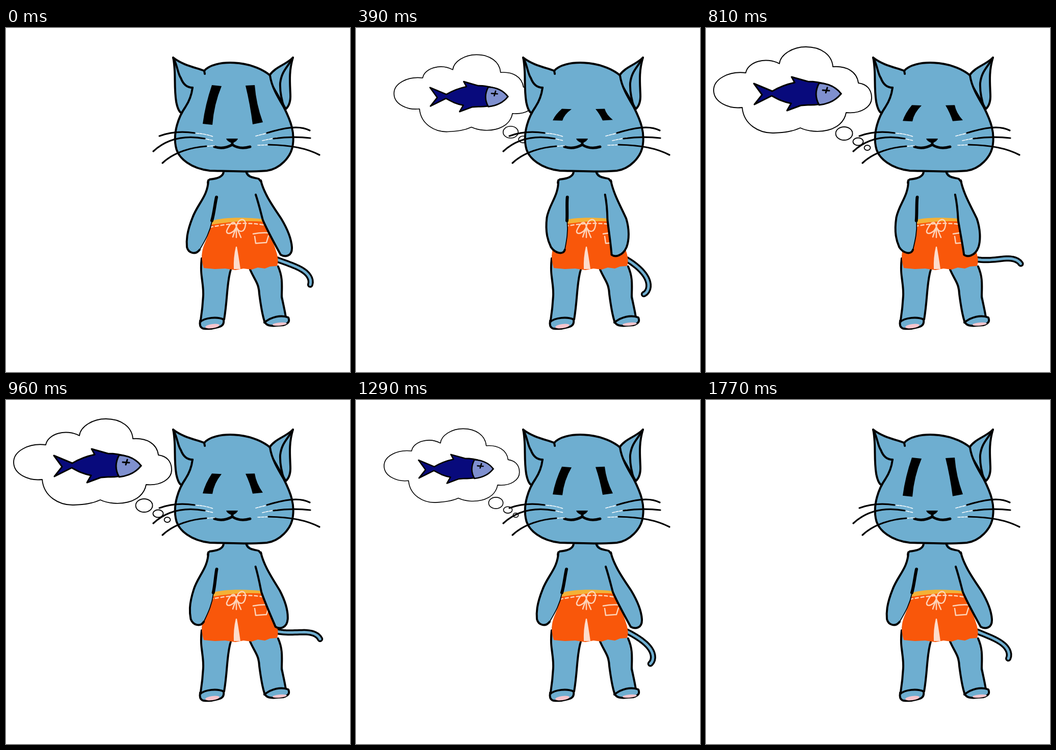
These frames come from a looping animation (675 by 675 pixels, 1800 ms). An HTML page:

```html
<!DOCTYPE html>
<html lang="en">
<head>
<meta charset="utf-8">
<title>Hungry cat</title>
<style>
  html, body { margin: 0; height: 100%; overflow: hidden; background: #fff; }
  svg { display: block; width: 100%; height: 100%; }
  path { stroke-linejoin: round; stroke-linecap: round; }
  .fur { fill: #6eaed0; stroke: #000; stroke-width: 4; }
  .bare { fill: #6eaed0; }
  .ink { fill: none; stroke: #000; stroke-width: 4; }
  .thin { stroke-width: 1.8; }
  .wide { stroke-width: 6; }
  .whisker { stroke-width: 3.2; }
  .stitch { fill: none; stroke: #fdd3b8; stroke-width: 2.5; }
  .bubble { fill: #fff; stroke: #000; stroke-width: 1.9; }
  .toe { fill: #f6c5cd; }
  .tail { fill: none; stroke: #000; stroke-width: 12; }
  .tail + .tail { stroke: #6eaed0; stroke-width: 5; }
</style>
</head>
<body>
<svg viewBox="0 0 675 675">
  <g id="cloud">
    <g class="bubble">
      <path d="M78 88C45 84 15 100 15 122C15 146 45 159 71 156C74 190 105 207 133 206C155 205 170 203 185 196C215 210 268 204 275 166C305 169 325 154 325 137C325 120 315 110 299 108C296 85 275 74 249 76C247 52 225 37 196 37C170 37 146 52 144 70C118 56 82 66 78 88Z"/>
      <ellipse cx="271" cy="207" rx="16.5" ry="13"/>
      <ellipse cx="298.5" cy="223" rx="10" ry="7.5"/>
      <ellipse cx="316.5" cy="235" rx="6" ry="5"/>
    </g>
    <g stroke="#000" stroke-width="3">
      <path fill="#080a7c" d="M94 109L130 124C145 115 160 110 174 107L168 96L200 105C225 105 250 112 265 129C250 145 225 152 200 151L186 152L159 162L167 148C150 145 140 139 129 133L95 150L110 131Z"/>
      <path fill="#7f90cf" d="M222 108C242 109 256 117 265 129C255 142 241 149 222 151Q210 130 222 108Z"/>
      <path fill="none" d="M229 122L242 123M238 117L235 127"/>
    </g>
  </g>

  <path class="tail"/><path class="tail"/>

  <g id="legs">
    <path class="bare" d="M384 445H442L434 510L428 574H382L387 520ZM477 465H534L541 510L550 570L506 576L496 510Z"/>
    <path class="ink" d="M384 452C380 485 388 500 387 525C386 545 384 560 382 573M441 474C433 500 435 530 428 572M479 474C488 495 496 500 497 522C500 545 502 560 507 575M534 468C544 490 541 510 541 528C545 545 547 555 549 567"/>
    <path class="fur" d="M381 574C378 592 388 591 402 590C420 587 429 586 427 572C415 566 390 568 381 577Z"/>
    <path class="fur" d="M507 576C512 588 530 584 545 583C555 579 557 575 554 568C540 562 520 567 507 578Z"/>
    <ellipse class="toe" cx="405" cy="585" rx="14" ry="4" transform="rotate(-8 405 585)"/>
    <ellipse class="toe" cx="537" cy="581" rx="14" ry="3" transform="rotate(-5 537 581)"/>
  </g>

  <g id="torso">
    <path class="bare" d="M428 275L427 288Q416 296 399 297L397 312L404 390H508L500 298Q478 295 472 275Z"/>
    <path class="ink" d="M427 282C426 293 412 296 400 297Q396 299 396 304M471 281C474 295 488 293 496 296L501 302"/>
  </g>

  <g id="shorts">
    <path fill="#f9570a" d="M403 381C440 376 480 377 507 379C514 398 525 420 530 438Q536 455 532 467L518 468L508 472L494 470L482 474L466 472L450 475L430 472L410 473L388 471C383 455 382 440 391 420Q400 398 403 381Z"/>
    <path fill="#f4b136" d="M403 379C425 371 470 371 504 375L506 380C470 377 435 381 402 386Z"/>
    <path class="stitch" stroke-dasharray="6 5" d="M400 391C435 384 475 380 508 387"/>
    <path class="stitch" d="M452 390C448 372 438 386 433 398C432 408 448 402 452 390C454 374 470 370 470 386C468 403 457 402 452 390L445 410M452 390V411M453 392L461 411"/>
    <path class="stitch" d="M485 404Q500 401 515 402M488 409L490 422.500L511 421L515 408"/>
    <path fill="#fddccb" d="M451 429Q446 450 447 473H460Q456 445 453 429Z"/>
  </g>

  <g class="arm" data-reach="44">
    <path class="bare" d="M397,299C396,330 376,345 366,372C354,402 354,418 355,430C358,442 372,446 380,435C392,415 400,400 404,380C408,365 410,345 413,332"/>
    <path class="ink" d="M397,299C396,330 376,345 366,372C354,402 354,418 355,430C358,442 372,446 380,435"/>
    <path class="ink thin" d="M380,435C392,415 400,400 404,380"/>
    <path class="ink wide" d="M404,378C408,365 410,345 413,332"/>
  </g>
  <g class="arm" data-reach="-48">
    <path class="fur" d="M500,299C506,325 524,350 540,374C552,394 560,415 561,430C562,448 548,450 539,445C528,425 514,400 504,377C500,362 496,345 490,327"/>
  </g>

  <g id="head">
    <path class="fur" d="M391 100L389 84C375 78 348 74 328 58C334 85 329 115 334 145Q338 165 345 167L375 150Z"/>
    <path class="fur" d="M515 100L517 93C528 76 550 72 563 58C555 85 557 105 558 130Q559 150 549 159Z"/>
    <path class="fur" d="M389 84C408 61 482 62 518 93C521 115 533 135 546 157C560 185 566 205 563 228C560 255 535 277 512 280C475 283 440 281 400 280C365 276 337 257 333 232C328 205 338 175 352 155C362 140 365 125 366 117"/>
    <path class="ink" d="M328 58C337 75 337 90 343 98Q350 117 366 117M389 84L390 90M563 58C552 78 541 84 538 108Q537 130 546 157"/>
    <path class="eye" d="M404 112L423 114Q408 150 405 190L386 188Q391 150 404 112Z"/>
    <path class="eye" d="M470 113L488 112Q491 150 504 185L484 189Q479 150 470 113Z"/>
    <path d="M432 217H455Q454 222 444 226Q434 223 432 217Z"/>
    <path class="ink" style="stroke-width:5" d="M444 224V229Q426 239 409 233M444 229Q459 239 479 233"/>
    <path fill="none" stroke="#fff" stroke-width="1.6" stroke-dasharray="5 2" d="M366 206Q390 207 406 213M380 215L407 221M380 233L409 231M490 212L518 205M503 221L532 215M494 230L524 229"/>
    <path class="ink whisker" d="M301 212C325 203 350 203 370 206M289 242C315 218 350 210 390 217M307 265C330 243 365 234 393 232M512 206C545 196 575 190 596 201M525 217C555 213 580 214 597 216M515 229C560 230 590 236 615 249"/>
  </g>
</svg>
<script>
const LOOP = 1800, STEP = 30;
const { PI, sin, cos, min, max, floor } = Math;
const all = selector => [...document.querySelectorAll(selector)];
const mix = (a, b, u) => a + (b - a) * u;
const ease = u => (1 - cos(PI * u)) / 2;

const cloud = document.getElementById("cloud");
const eyes = all(".eye"), tails = all(".tail");
const arms = all(".arm path").map(path => ({
  path, shape: path.getAttribute("d"), reach: +path.parentNode.dataset.reach
}));

// Bend sideways from the shoulder, more towards the hand.
function drawArms(t) {
  const u = t < 600 ? ease(t / 600) : ease(max(0, 1110 - t) / 510);
  for (const { path, shape, reach } of arms) {
    path.setAttribute("d", shape.replace(/([\d.]+),([\d.]+)/g,
      (_, x, y) => `${+x + reach * u * ((y - 300) / 140) ** 2},${y}`));
  }
}

// A chain of short links, hooked at the tip and curling with the swing.
function drawTail(t) {
  const swing = t < 1140 ? sin(2 * PI * t / 1140) : .8 * sin(PI * (t - 1140) / 660);
  const links = 20, length = 90;
  let x = 531, y = 454, d = `M${x} ${y}`;
  for (let i = 0; i < links; i++) {
    const u = (i + .5) / links;
    const angle = (20 + 90 * u ** 4 + swing * (12 + 42 * u)) * PI / 180;
    x += cos(angle) * length / links;
    y += sin(angle) * length / links;
    d += `L${x} ${y}`;
  }
  for (const tail of tails) tail.setAttribute("d", d);
}

function drawEyes(t) {
  const open = t < 570 ? 1 - min(1, t / 450) : ((t - 570) / (LOOP - 570)) ** .8;
  for (const eye of eyes)
    eye.setAttribute("transform", `translate(0 178.4) scale(1 ${mix(.19, 1, open)}) translate(0 -178.4)`);
}

// Slides out from behind the head, later shrinks away beside it.
function drawCloud(t) {
  const leaving = t >= 1080;
  const u = leaving ? max(0, 1 - ((t - 1080) / 555) ** 2) : min(1, t / 480);
  const [x, y, size] = leaving ? [295, 172, 0] : [400, 156, .436];
  cloud.setAttribute("visibility", u ? "visible" : "hidden");
  cloud.setAttribute("transform",
    `translate(${mix(x, 170, u)} ${mix(y, 122, u)}) scale(${mix(size, 1, u)}) translate(-170 -122)`);
}

const start = performance.now();
function tick() {
  const t = floor((performance.now() - start) % LOOP / STEP) * STEP;
  for (const part of [drawCloud, drawTail, drawArms, drawEyes]) part(t);
  requestAnimationFrame(tick);
}
tick();
</script>
</body>
</html>
```
